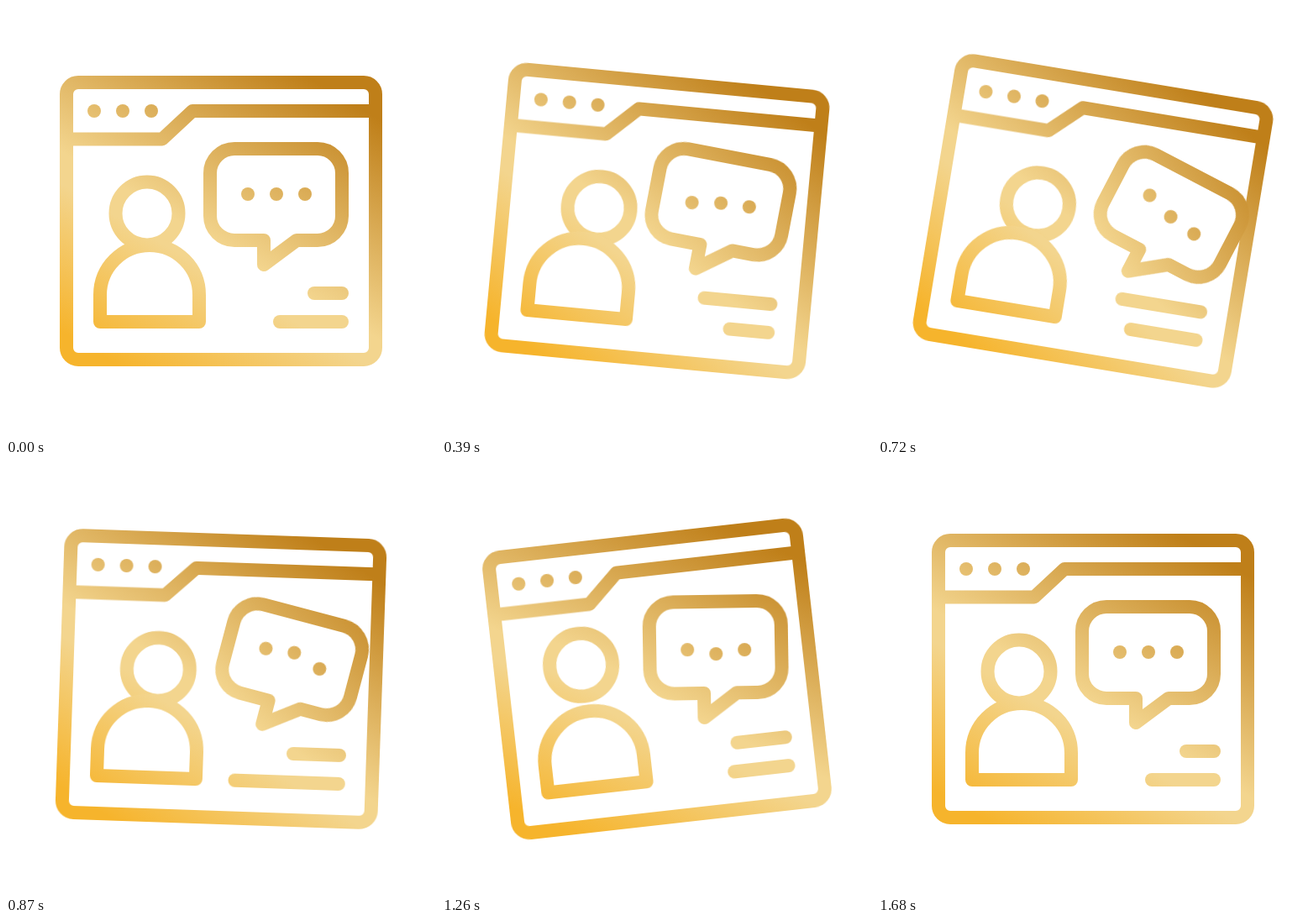
Recreate the animation shown at these times as an HTML page. Size 512 by 512 pixels, loop 1800 ms.

```html
<!DOCTYPE html>
<html lang="en">
<head>
<meta charset="utf-8">
<title>Chat window icon</title>
<style>
  html, body { margin: 0; width: 100%; height: 100%; overflow: hidden; background: #fff; }
  svg { display: block; width: 100vw; height: 100vh; }
  .ink { fill: none; stroke: url(#gold); stroke-width: 16; stroke-linecap: round; stroke-linejoin: round; }
  .dot { fill: url(#gold); stroke: none; }
  #win { transform-origin: 256px 256px; }
  #bubble { transform-origin: 307px 308px; }
</style>
</head>
<body>
<svg viewBox="0 0 512 512">
  <defs>
    <linearGradient id="gold" gradientUnits="userSpaceOnUse" x1="149" y1="437" x2="358" y2="84">
      <stop offset="0" stop-color="#f6b42c"/>
      <stop offset=".37" stop-color="#f3d58e"/>
      <stop offset=".45" stop-color="#f3d58e"/>
      <stop offset="1" stop-color="#bf7f19"/>
    </linearGradient>
  </defs>
  <g id="win" class="ink">
    <rect x="72" y="91" width="368" height="330" rx="14"/>
    <path d="M72 158.5H186L222 125H440" stroke-linecap="butt"/>
    <circle class="dot" cx="105" cy="125" r="8"/>
    <circle class="dot" cx="139" cy="125" r="8"/>
    <circle class="dot" cx="173" cy="125" r="8"/>
    <circle id="head" cx="168" cy="247" r="37.5"/>
    <path d="M112 376V344A59 59 0 0 1 230 344V376Z"/>
    <path id="lineA" d="M400 342H200"/>
    <path id="lineB" d="M400 376H200"/>
    <g id="bubble">
      <path d="M272 170H371A29 29 0 0 1 400 199V250A29 29 0 0 1 371 279H346L307 308V279H272A29 29 0 0 1 243 250V199A29 29 0 0 1 272 170Z"/>
      <circle id="dot0" class="dot" cx="288" cy="224" r="8"/>
      <circle id="dot1" class="dot" cx="322" cy="224" r="8"/>
      <circle id="dot2" class="dot" cx="356" cy="224" r="8"/>
    </g>
  </g>
</svg>
<script>
  const STEP = 30, STEPS = 60;

  // Eases from rest through evenly spaced peaks and back to rest; times are in steps.
  function swing(t, start, end, ...peaks) {
    if (t <= start || t >= end) return 0;
    const stops = [0, ...peaks, 0];
    const pos = (t - start) / (end - start) * (peaks.length + 1);
    const i = Math.floor(pos), x = pos - i;
    return stops[i] + (stops[i + 1] - stops[i]) * x * x * (3 - 2 * x);
  }

  function play(id, pose) {
    const frames = Array.from({ length: STEPS + 1 }, (_, i) => ({
      offset: i / STEPS,
      easing: "step-end",
      ...pose(i % STEPS)
    }));
    const anim = document.getElementById(id).animate(frames, {
      duration: STEP * STEPS,
      iterations: Infinity
    });
    anim.startTime = 0;
  }

  const turn = deg => ({ transform: `rotate(${deg}deg)` });
  const move = (x, y) => ({ transform: `translate(${x}px, ${y}px)` });
  const reveal = len => ({ strokeDasharray: `${len}px 999px` });

  play("win", t => turn(swing(t, 5, 53.6, 10.9, -8)));
  play("bubble", t => turn(swing(t, 6, 56, 7, 19.5, -11, 14.5)));
  play("head", t => move(swing(t, 5, 35, 20, 20), swing(t, 35, 56, -24)));
  play("lineA", t => reveal(33 + swing(t, 5, 34, 80) + swing(t, 34, 56, 30)));
  play("lineB", t => reveal(74 + swing(t, 5, 56, -41, 53, -11)));

  for (let i = 0; i < 3; i++)
    play("dot" + i, t => move(0, swing(t - i * 4.9, 5, 46, 8.8, -8.8, 8.8)));
</script>
</body>
</html>
```
